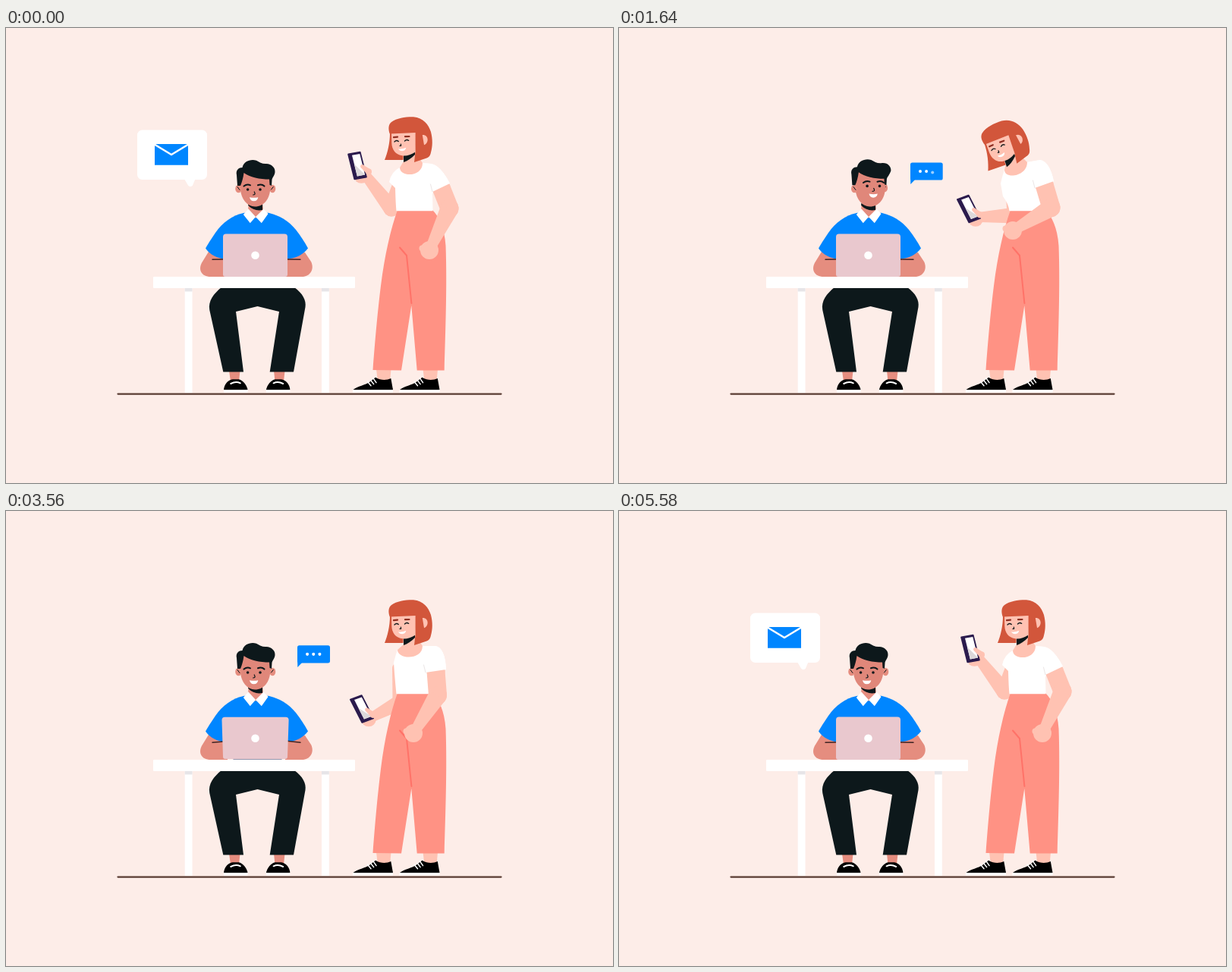
These frames come from a looping animation (800 by 600 pixels, 5980 ms). An HTML page with a canvas:

```html
<!DOCTYPE html>
<html lang="en">
<head>
<meta charset="utf-8">
<title>Office chat</title>
<style>
html, body { margin: 0; width: 100%; height: 100%; overflow: hidden; background: #fdede8; }
canvas { display: block; width: 800px; height: 600px; }
</style>
</head>
<body>
<canvas id="stage" width="800" height="600"></canvas>
<script>
const ctx = document.getElementById('stage').getContext('2d');
const LOOP = 5980;
const C = {
  bg: '#fdede8', ink: '#0d181b', blue: '#0086ff', white: '#ffffff',
  tan: '#e58d7f', tanFace: '#e0877a', peach: '#ffc2b2', coral: '#ff9284',
  fold: '#ff7268', red: '#d2563b', laptop: '#e9c8ce', phone: '#2b1b4d', ground: '#5a3c33'
};

// ---- timing: monotone cubic through [time, ...values] keys ----
function slope(a, b, c, i) {
  const p = (b[i] - a[i]) / (b[0] - a[0]), q = (c[i] - b[i]) / (c[0] - b[0]);
  return p * q <= 0 ? 0 : 2 * p * q / (p + q);
}
function track(t, keys) {
  const last = keys.length - 1;
  if (t <= keys[0][0]) return keys[0].slice(1);
  if (t >= keys[last][0]) return keys[last].slice(1);
  let k = 0;
  while (t > keys[k + 1][0]) k++;
  const a = keys[k], b = keys[k + 1], d = b[0] - a[0], u = (t - a[0]) / d;
  const out = [];
  for (let i = 1; i < a.length; i++) {
    const m = k > 0 ? slope(keys[k - 1], a, b, i) * d : 0;
    const n = k + 1 < last ? slope(a, b, keys[k + 2], i) * d : 0;
    const s = u * u * (3 - 2 * u);
    out.push(a[i] + (b[i] - a[i]) * s + m * u * (1 - u) * (1 - u) - n * u * u * (1 - u));
  }
  return out;
}

const MAIL = [[270, 1], [760, 1.08], [1200, 0], [3730, 0], [4390, 1.09], [4850, 1]];
const CHAT = [[375, 0], [1030, 1.09], [1490, 1], [3500, 1], [3840, 1.09], [4200, 0]];
const TURN = [[160, 0], [820, 1], [2480, 1], [3166, 0]];
const LID = [[3200, 0], [3700, 1.25], [4560, 0]];
const DOT = [[1200, 4, 0], [1550, 0, 1], [1850, 0, 1], [2020, -3, 1], [2200, 0, 1]];
const HEAD = [
  [200, 539, 177, 0], [840, 529, 178, -9], [1220, 526, 178.3, -16.5], [1820, 525.2, 178.5, -19],
  [2420, 526, 178.3, -16.5], [2940, 532.5, 177, -12], [3570, 539, 177, 0]
];

// neckL, sleeveL, sideL | neckR, shoulder, cuffOut, cuffIn | elbowR, handR | elbowL, wristL, phone, angle
const raised = [519, 184, 505, 203, 513, 211, 549, 178, 567, 179, 585, 205, 562, 216,
  584.5, 238, 558, 293, 508, 238, 473, 193, 463, 181.5, -14];
const lowering = [511, 185, 505, 206, 508, 224, 543, 177, 568, 176, 578, 203, 552, 213,
  575, 238, 529, 274, 520, 241.5, 473, 237.5, 461.5, 224, -25];
const leaning = [508, 187, 503, 205, 506, 222, 538, 177, 562, 174, 573, 202, 548, 211,
  569.5, 237, 519, 267, 522, 247, 474, 249.5, 461, 238.5, -27];
const rising = [513, 184, 507, 206, 510, 220, 543, 178, 570, 177, 578, 205, 551, 213,
  571.5, 241, 524, 274, 520, 249, 476, 257, 463, 245, -27];
const resting = [516, 183, 511, 200, 512, 214, 549, 178, 573, 178, 580, 209, 553, 213,
  569, 243, 537, 293, 520, 252, 484, 271, 469, 261, -27];
const BODY = [
  [230, ...raised], [840, ...lowering], [1210, ...leaning], [2440, ...leaning],
  [2940, ...rising], [3570, ...resting], [4425, ...resting], [5560, ...raised]
];

// ---- drawing helpers ----
function fill(d, color) { ctx.fillStyle = color; ctx.fill(new Path2D(d)); }
function line(d, color, w) {
  ctx.strokeStyle = color; ctx.lineWidth = w; ctx.lineCap = 'round'; ctx.lineJoin = 'round';
  ctx.stroke(new Path2D(d));
}
function rect(x, y, w, h, color, r = 0) {
  ctx.fillStyle = color; ctx.beginPath(); ctx.roundRect(x, y, w, h, r); ctx.fill();
}
function oval(x, y, rx, ry, color) {
  ctx.fillStyle = color; ctx.beginPath(); ctx.ellipse(x, y, rx, ry, 0, 0, 7); ctx.fill();
}
function dot(x, y, r, color) { oval(x, y, r, r, color); }
function moved(x, y, fn) { ctx.save(); ctx.translate(x, y); fn(); ctx.restore(); }
function scaled(x, y, s, fn) {
  if (s < 0.01) return;
  moved(x, y, () => { ctx.scale(s, s); ctx.translate(-x, -y); fn(); });
}
function limb(ax, ay, ar, bx, by, br, color) {
  const dir = Math.atan2(by - ay, bx - ax), n = dir + Math.PI / 2;
  const cx = Math.cos(n), cy = Math.sin(n);
  dot(ax, ay, ar, color);
  dot(bx, by, br, color);
  fill(`M${ax + cx * ar} ${ay + cy * ar}L${bx + cx * br} ${by + cy * br}` +
    `L${bx - cx * br} ${by - cy * br}L${ax - cx * ar} ${ay - cy * ar}Z`, color);
}

// ---- bubbles ----
function mail(t) {
  scaled(243, 209, track(t, MAIL)[0], () => {
    rect(173, 134.5, 92, 65.5, C.white, 6.5);
    fill('M235 199L240 207.5Q243 211 246 207.5L249.5 199Z', C.white);
    rect(196, 153, 44, 27.7, C.blue);
    ctx.save();
    ctx.beginPath(); ctx.rect(195, 152, 46, 30); ctx.clip();
    line('M194 152.5L218 167L242 152.5', C.white, 2.5);
    ctx.restore();
  });
}
function chat(t) {
  scaled(384.3, 206, track(t, CHAT)[0], () => {
    rect(384, 177.5, 42.7, 23, C.blue, 2.6);
    fill('M384 190L384.3 206L390.5 199.5Z', C.blue);
    for (let i = 0; i < 3; i++) {
      const [dy, a] = track(t - i * 120, DOT);
      ctx.globalAlpha = Math.max(0, a);
      dot(397 + i * 8.1, 189 + dy, 2, C.white);
      ctx.globalAlpha = 1;
    }
  });
}

// ---- man ----
function manHead(k) {
  const fx = 8.5 * k, fy = -4.6 * k, hx = 2.4 * k, hy = -0.8 * k;
  oval(351.3 - 1.2 * k, 212 - k, 4, 5.3, C.tan);
  line(`M${349.5 - k} 213L${352.3 - k} 209.5`, C.ink, 1);
  moved(2.6 * k, 0, () => fill('M308.5 194L309 213C310 226 318 235.3 328 235.5C340 235.5 347.6 225 348.3 212L349 196L344 186L314 186Z', C.tanFace));
  oval(306.5 + 3.8 * k, 212, 4.3, 5.3, C.tan);
  line(`M${305 + 4 * k} 209.5L${308 + 4 * k} 213.5`, C.ink, 1);
  moved(hx, hy, () => fill(
    `M305 208L304 194C302.5 187 307 184 311.5 184C313 176 322 172.5 330 174.7C334 177 338 179.5 343 179` +
    `C${350 + k} ${179.5 - 2 * k} ${355 + 1.5 * k} ${184 - k} ${354.5 + 1.5 * k} ${190 - k}` +
    `C354 195 351 197 350.5 200L350 208L347.5 207L347 199.5C335 199.5 321 197 313.5 191C312.5 198 311 203 309 208Z`, C.ink));
  moved(fx, fy, () => {
    line('M313.5 208.6Q317.5 205.3 322 207.3M332 207.3Q337 205.3 340.5 208.6', C.ink, 2);
    dot(318.6, 213, 1.8, C.ink);
    dot(335, 213, 1.8, C.ink);
    line('M327.2 216Q329.6 220 325.6 220', C.ink, 1.2);
    fill('M321 223.2Q327 224.5 332.3 223.2Q331.5 228.3 326.6 228.3Q322 228 321 223.2Z', C.white);
  });
}
function manShoe(x, flip) {
  moved(x, 0, () => {
    ctx.scale(flip, 1);
    rect(-15.7, 477, 31.4, 3.6, C.white);
    fill('M-15.7 477C-15.5 470 -10 464 -4 463.3L4 463.3C10 465 14.5 471 15.7 477Z', '#000');
    line('M-6.5 469Q0 465.5 6 468.3', C.white, 2);
  });
}
function man(t) {
  const k = track(t, TURN)[0], a = track(t, LID)[0];
  fill('M294 452L308.5 452L307 466L296 466ZM353 452L367.5 452L366 466L354.5 466Z', C.tan);
  manShoe(302.8, 1);
  manShoe(358.6, -1);
  fill('M284 342L380 342C391 350 396 359 394.5 368L379 453.5L347.7 453.5L360 374L331.5 367L303 374L313 453.5L286.3 453.5L268.3 372C266 360 274 350 284 342Z', C.ink);
  fill('M267 295L259 308C252.5 318 257 328 270 328L292 328L292 298ZM394 296L402 308C407 318 401 328 390 328L368 328L368 298Z', C.tan);
  fill('M314 243.8C298 247 285 257 276 270C270 279 266 285 263 290.5C267 297 275 302 284 304L374 304C384 303 392 298 398 290.5C393 281 388 274 382 266C372 254 360 247 346 243.8Z', C.blue);
  line(`M272 305.2L287 ${305 - a}M370 ${305 - 1.7 * a}L388 305.2`, '#3d2222', 1.4);
  fill('M320 230L338 230L339 240L329 251L319 240Z', C.tan);
  fill('M319.2 231Q328 237 338 232L338 240Q327 242 319.2 234Z', C.ink);
  fill('M319.5 238.5L312.8 246L321.8 257.3L329 249ZM339.5 238.5L345.5 245L336.8 257.3L329 249Z', C.white);
  manHead(k);
  if (a > 0.3) line('M300 327.4L363 327.4', '#9495ad', 1.2);
  const l = 286 - 1.5 * a, r = 371 + 1.6 * a, b = 328 - 0.9 * a, y = 271.6 + 0.2 * a;
  fill(`M${l} ${y + 4}Q${l} ${y} ${l + 4} ${y}L${r - 4} ${y}Q${r} ${y} ${r} ${y + 4}` +
    `L371 ${b - 3}Q371 ${b} 368 ${b}L289 ${b}Q286 ${b} 286 ${b - 3}Z`, C.laptop);
  dot(328.5, 299.8, 5.3, C.white);
}
function table() {
  for (const x of [235.7, 416]) {
    rect(x, 343, 9.8, 138, C.white);
    rect(x, 343, 9.8, 4.5, '#e7e5e8');
  }
  rect(194, 328, 266, 15, C.white, 1);
}

// ---- woman ----
function womanShoe(x) {
  moved(x, 0, () => {
    fill('M488 450L507.5 450L506 466L490 466Z', C.peach);
    rect(457, 477, 53, 3.6, C.white);
    fill('M457.5 477C463 472.5 474 470.5 479 467L487 460.8C494 465 502 464.5 507.3 462L510 477Z', '#000');
    line('M476.5 466.3L481 471.7M480.3 464L484.6 469.6M483.8 461.6L488 467.6', C.white, 1.5);
  });
}
function phone(x, y, deg) {
  const h = deg * Math.PI / 180, w = h * 0.75;
  const at = (u, v) => (x + u * 17.4 * Math.cos(w) - v * 36 * Math.sin(h)) + ' ' +
    (y + u * 17.4 * Math.sin(w) + v * 36 * Math.cos(h));
  const shape = (pts, color) => fill('M' + pts.map(p => at(...p)).join('L') + 'Z', color);
  const frame = [[-.45, -.47], [.45, -.47], [.45, .47], [-.45, .47]];
  shape(frame, C.phone);
  line('M' + frame.map(p => at(...p)).join('L') + 'Z', C.phone, 2);
  shape([[-.2, -.41], [.4, -.41], [.4, .38], [-.2, .38]], C.white);
  shape([[-.2, -.08], [.4, .38], [-.2, .38]], '#dcd8da');
}
function womanHead(x, y, deg) {
  moved(x, y, () => {
    ctx.rotate(deg * Math.PI / 180);
    ctx.translate(-539, -177);
    fill('M524 168L539 162L539 167C534 172 529 175.5 524 177Z', C.ink);
    fill('M506 138C506 152 503 164 499 174L523.5 174L524 160L512 138Z', C.red);
    fill('M508 137L541 135L539.5 163.5C533 167.5 528 169 522 168.3C513 167 508.7 160 508.3 152Z', C.peach);
    fill('M505.8 139.6C503.5 133 504 127 508 124C515 118.5 527 117 537 117.2C550 118.5 557 127 560 137C562.5 147 562.3 156 560 164C559 169 557 171 553 172L538 177L539.6 163L539.6 138Z', C.red);
    fill('M548.8 141C557.5 140.5 557.5 152 551 154.2Z', C.peach);
    line('M511 144.1L516 143.6M526 143.2L531.5 143', '#8f2f22', 2.2);
    line('M512 150Q514.5 147.2 517.3 149.6M525.5 149Q528 146.3 530.7 148.4', C.ink, 1.3);
    line('M520.4 153L520.6 155.4L519 155.4', C.ink, 1.2);
    fill('M517 159.3Q522.5 160 527.3 157.8Q526.5 162 522.3 162.2Q518.5 162.2 517 159.3Z', C.white);
  });
}
function woman(t) {
  const p = track(t, BODY), [px, py, deg] = track(t, HEAD);
  const [nlx, nly, slx, sly, sdx, sdy, nrx, nry, shx, shy, cox, coy, cix, ciy] = p;
  const [ex, ey, hx, hy, lx, ly, wx, wy, fx, fy, fa] = p.slice(14);

  // phone arm
  limb(515, 207, 6, lx, ly, 10.5, C.peach);
  limb(lx, ly, 10.5, wx, wy, 6.5, C.peach);
  const reach = 9 + (fa + 27) * -0.28;
  oval(fx + reach, fy + 14.5, 9.5, 8.8, C.peach);
  limb(wx, wy, 6.5, fx + reach + 2, fy + 13, 7, C.peach);
  phone(fx, fy, fa);
  limb(fx + 6.5, fy + 1, 2.4, fx + 15, fy + 8, 4, C.peach);

  womanShoe(0);
  womanShoe(61.5);
  fill('M516 240L562 240C570 248 578 263 579.5 287C581.5 340 579 405 577.7 451.5L541.7 451.5L534.3 366L521 451.5L483.5 451C487 405 490 372 494 340C499 300 507 265 516 240Z', C.coral);
  line('M519 289.5L528 300L534.4 363', C.fold, 2);

  // top and neck
  const waist = 514.5;
  fill(`M${nlx} ${nly}Q${slx + 3} ${nly + 5} ${slx} ${sly}L${sdx} ${sdy}Q${waist - 1} 232 ${waist} 241.3` +
    `L562.5 241.3L${Math.max(cix, 560)} ${ciy + 2}L${cox} ${coy}` +
    `Q${shx + 5} ${shy + 1} ${shx - 7} ${shy}L${nrx} ${nry}L${px - 14} ${py - 1}Z`, C.white);
  fill(`M${px - 15} ${py - 9}L${px} ${py - 14}L${nrx} ${nry}` +
    `C${nrx} ${nry + 19} ${nlx} ${nly + 13} ${nlx} ${nly}L${px - 15} ${py - 1}Z`, C.peach);

  // free arm
  limb((cox + cix) / 2, (coy + ciy) / 2, 12, ex, ey, 12, C.peach);
  const d = Math.hypot(ex - hx, ey - hy);
  limb(ex, ey, 12, hx + (ex - hx) / d * 8, hy + (ey - hy) / d * 8, 7, C.peach);
  dot(hx, hy, 12, C.peach);
  dot(hx - 9.5, hy - 2.5, 4, C.peach);

  // sleeve
  fill(`M${cix} ${ciy}L${cox} ${coy}Q${shx + 6} ${shy + 3} ${shx - 7} ${shy}L${nrx} ${nry}L${cix - 5} ${ciy - 14}Z`, C.white);
  line(`M${cix - 2.5} ${ciy - 10}L${cix} ${ciy}`, '#ebe5e5', 1);

  womanHead(px, py, deg);
}

function draw(t) {
  rect(0, 0, 800, 600, C.bg);
  line('M147.5 482.6L652.5 482.6', C.ground, 2.3);
  mail(t);
  man(t);
  table();
  chat(t);
  woman(t);
}

let start = null;
function tick(now) {
  if (start === null) start = now;
  draw((now - start) % LOOP);
  requestAnimationFrame(tick);
}
draw(0);
requestAnimationFrame(tick);
</script>
</body>
</html>
```
